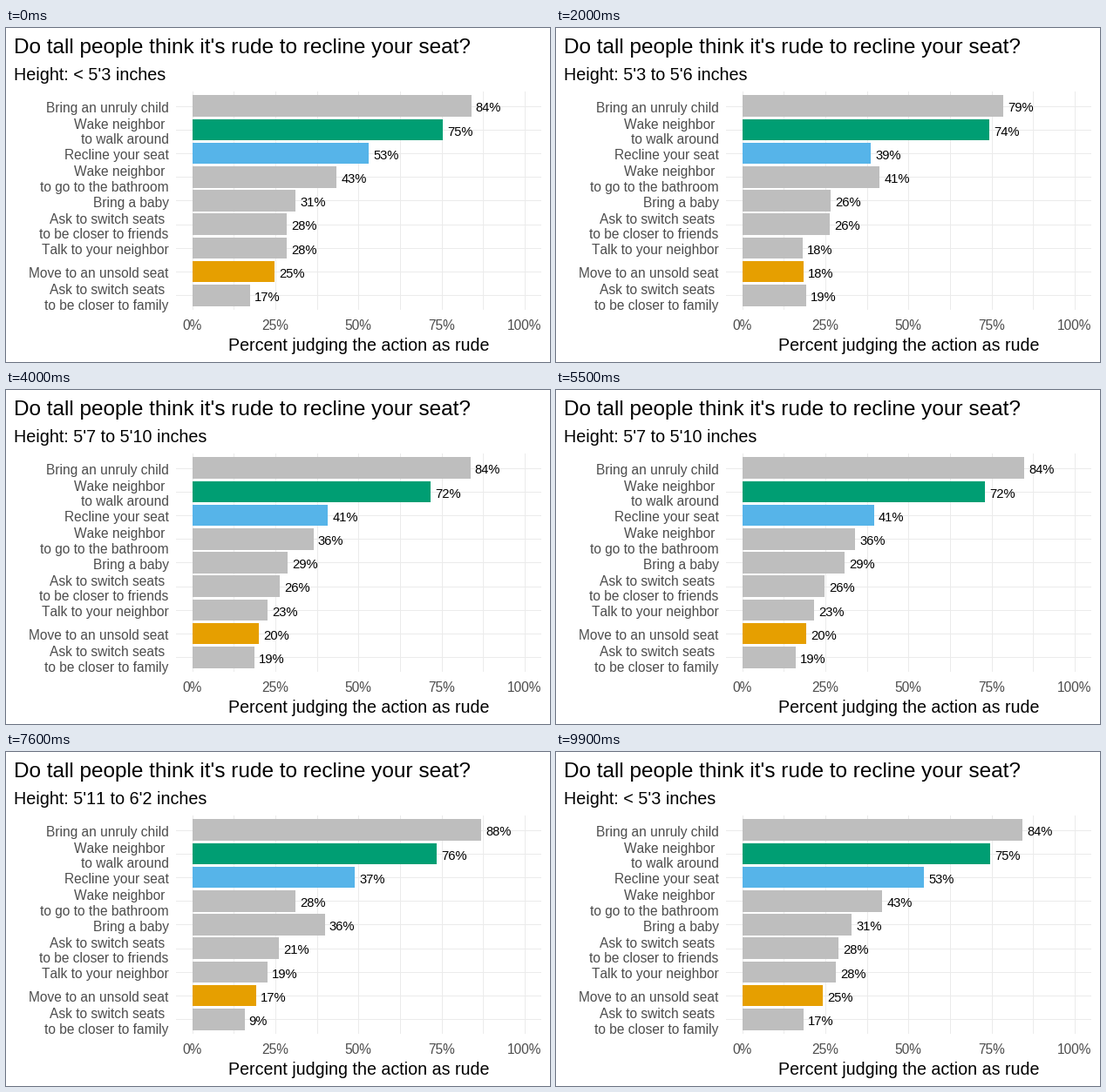
Recreate the animation shown at these times as a matplotlib script. Size 624 px wide and 384 px high, loop 10000 ms.

```python
import matplotlib.pyplot as plt
import numpy as np
from matplotlib.animation import FuncAnimation
from matplotlib.patches import Rectangle

W, H, DPI = 624, 384, 96
FRAMES, STEP_MS = 100, 100
HOLD, MOVE = 13, 7          # frames at rest, then frames in motion
X0, X1 = 214, 595           # 0 % and 100 %
LEFT, RIGHT, TOP, BOTTOM = 195, 614, 73, 324
ROW0, PITCH, BAR = 89.7, 27.2, 24.5
TICK_SIZE, LABEL_SIZE, NAME_SIZE = 15.5, 14.7, 15.5
GRID, AXIS = "#EBEBEB", "#4D4D4D"
COLORS = {"Wake neighbor\nto walk around": "#009E73",
          "Recline your seat": "#56B4E9",
          "Move to an unsold seat": "#E69F00"}

# survey results in percent, one column per height group
HEIGHTS = ["< 5'3", "5'3 to 5'6", "5'7 to 5'10", "5'11 to 6'2", "> 6'2"]
SURVEY = {
    "Bring an unruly child": (83.9, 78.6, 83.6, 87.7, 86.0),
    "Wake neighbor\nto walk around": (75.3, 74.3, 71.7, 75.9, 70.1),
    "Recline your seat": (53.0, 38.6, 40.7, 36.6, 65.0),
    "Wake neighbor\nto go to the bathroom": (43.3, 41.2, 36.4, 27.8, 35.0),
    "Bring a baby": (31.0, 26.4, 28.6, 36.4, 44.4),
    "Ask to switch seats\nto be closer to friends": (28.3, 26.2, 26.2, 21.0, 32.4),
    "Talk to your neighbor": (28.3, 18.1, 22.6, 18.9, 27.2),
    "Move to an unsold seat": (24.7, 18.4, 19.9, 17.1, 21.7),
    "Ask to switch seats\nto be closer to family": (17.3, 19.2, 18.6, 9.4, 24.4),
}

plt.rcParams["font.family"] = "Liberation Sans"
plt.rcParams["text.kerning_factor"] = 6     # practically no kerning
fig = plt.figure(figsize=(W / DPI, H / DPI), dpi=DPI, facecolor="white")
ax = fig.add_axes([0, 0, 1, 1])
ax.set(xlim=(0, W), ylim=(H, 0))
ax.axis("off")


def px(share):
    return X0 + share / 100 * (X1 - X0)


def text(x, y, s, size, color="black", ha="left"):
    return ax.text(x, y, s, fontsize=size * 72 / DPI, color=color,
                   ha=ha, va="baseline")


def box(x, y, w, h, color, z):
    return ax.add_patch(Rectangle((x, y), w, h, fc=color, lw=0,
                                  antialiased=False, zorder=z))


def add_grid():
    for share in np.arange(0, 101, 12.5):
        box(round(px(share) - 0.2), TOP, 1, BOTTOM - TOP, GRID, 1)
        if share % 25 == 0:
            text(px(share) - 0.5, 347, f"{share:.0f}%", TICK_SIZE, AXIS, "center")


def add_name(name, mid):
    *first, last = name.split("\n")
    for line in first:
        text(182, round(mid - 0.9), line, NAME_SIZE, AXIS, "right")
    drop = 16.3 if first else 7.3
    text(186.5, round(mid + drop), last, NAME_SIZE, AXIS, "right")


def add_row(i, name):
    mid = ROW0 + i * PITCH
    top, base = round(mid - BAR / 2), round(mid + BAR / 2)
    box(LEFT, round(mid), RIGHT - LEFT, 1, GRID, 1)
    add_name(name, mid)
    bar = box(X0, top, 1, base - top, COLORS.get(name, "#BEBEBE"), 2)
    return bar, text(0, round(mid + 6.7), "", LABEL_SIZE)


add_grid()
rows = [add_row(i, name) for i, name in enumerate(SURVEY)]
text(9, 29, "Do tall people think it's rude to recline your seat?", 24.4)
subtitle = text(9, 60, "", 19.8)
text(404.5, 371, "Percent judging the action as rude", 19.6, ha="center")


def draw(frame):
    state, step = divmod(frame, HOLD + MOVE)
    after = (state + 1) % len(HEIGHTS)
    t = max(0, step - HOLD) / MOVE
    shown = state if t < 0.5 else after
    subtitle.set_text(f"Height: {HEIGHTS[shown]} inches")
    for (bar, label), shares in zip(rows, SURVEY.values()):
        end = px(shares[state] * (1 - t) + shares[after] * t)
        bar.set_width(round(end) - X0)
        s = f"{shares[shown]:.0f}%"
        label.set_text(s)
        # the gap is a fifth of the label's width
        label.set_x(end - 0.7 + 0.2 * LABEL_SIZE * (0.556 * len(s) + 0.333))
    return [subtitle] + [artist for row in rows for artist in row]


anim = FuncAnimation(fig, draw, frames=FRAMES, interval=STEP_MS,
                     repeat=True, repeat_delay=0, blit=False)
plt.show()
```
